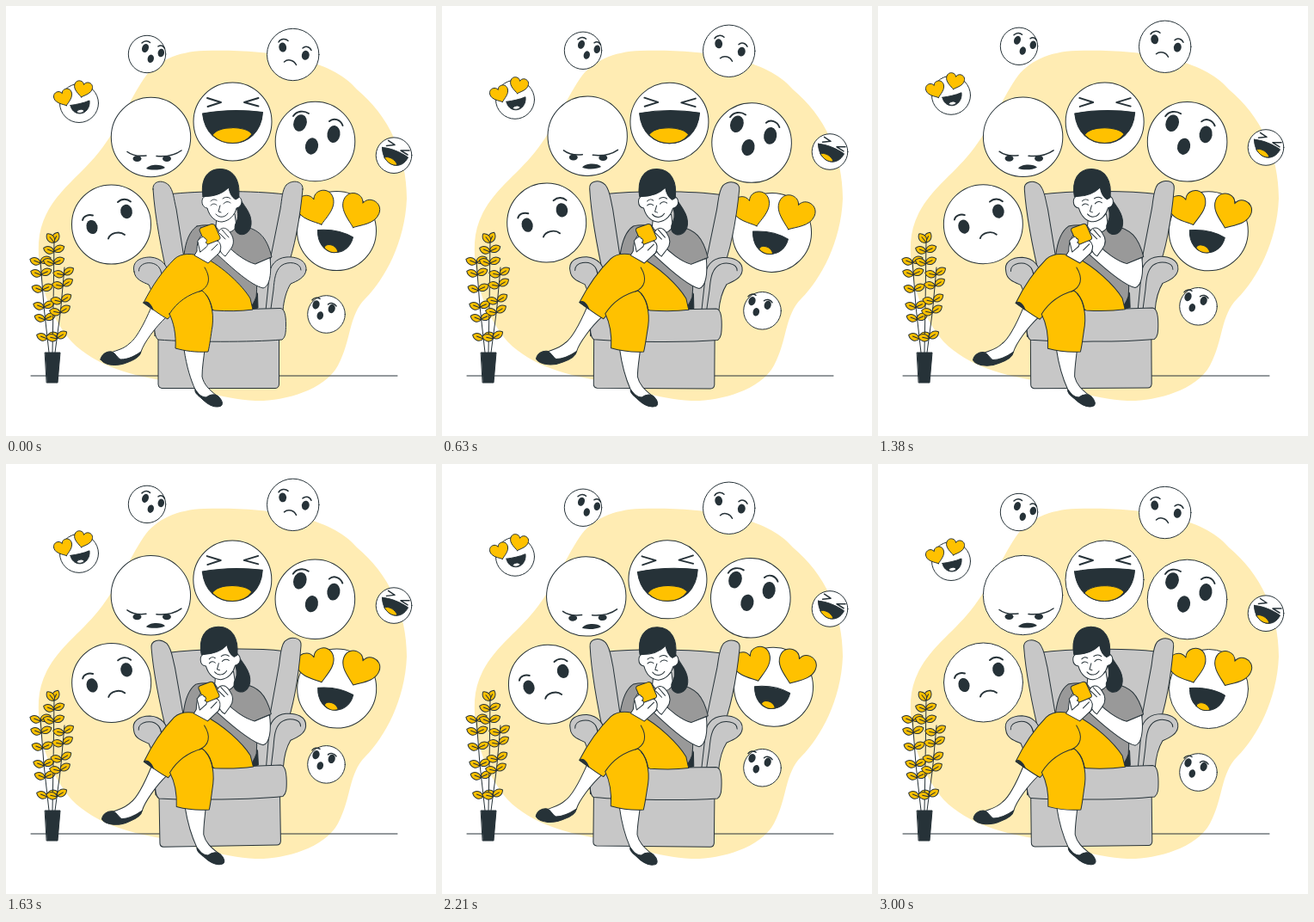
An HTML page for the animation above (3.04 s loop, 500 by 500 pixels).

```html
<!DOCTYPE html>
<html lang="en">
<head>
<meta charset="utf-8">
<title>Reactions</title>
<style>
  html, body { margin: 0; width: 100%; height: 100%; overflow: hidden; background: #fff; }
  svg { display: block; width: 100%; height: 100%; }
  .ink { fill: none; stroke: #263238; stroke-width: 1; stroke-linecap: round; stroke-linejoin: round; }
  .bold { stroke-width: 1.9; }
  .mid { stroke-width: 1.5; }
  .white { fill: #fff; }
  .gold { fill: #ffc100; }
  .dark { fill: #263238; }
  .chair { fill: #c7c7c7; }
  .shirt { fill: #999; }
  .none { fill: none; }
</style>
</head>
<body>
<svg viewBox="0 0 500 500" class="ink">
  <defs>
    <path id="heart" d="M0 20C-7 14-22 7-22-6C-22-14-16-18-10.500-18C-5-18-1.500-15 0-10.500C1.500-15 5-18 10.500-18C16-18 22-14 22-6C22 7 7 14 0 20Z" vector-effect="non-scaling-stroke"/>
  </defs>

  <path fill="#ffecb3" stroke="none" d="M230 52C290 50 375 57 408 97C445 128 466 172 466 224C464 275 440 318 418 340C398 360 402 388 386 418C370 448 320 460 290 459C250 457 215 443 185 436C150 430 105 420 76 390C50 360 36 318 38 275C42 225 80 205 108 170C132 140 142 112 160 85C174 64 200 53 230 52Z"/>
  <path d="M29 430H455"/>
  <g id="plant"></g>
  <path class="dark" d="M45.500 403H63L60 438H47.500Z"/>

  <g id="ring">
    <!-- angry -->
    <circle class="white" cx="168.500" cy="152.500" r="46.200"/>
    <path class="mid" d="M141 169.500C147 174 155 175 163 174M175 174.500C186 175.500 197 173 204 168"/>
    <g class="dark" stroke="none">
      <ellipse cx="152.500" cy="177.500" rx="5" ry="3.500"/>
      <ellipse cx="187" cy="177.500" rx="5" ry="3.500"/>
      <path d="M163 189C167 183.500 181 183.500 185 188C180 191 168 191.500 163 189Z"/>
    </g>
    <!-- laughing -->
    <circle class="white" cx="263.500" cy="134.500" r="45.500"/>
    <path class="bold" d="M234 107L250 112L234.500 117M293.500 107L277 112L293.500 116.500"/>
    <path class="dark" d="M228.500 125C250 121 276 120.500 298.500 123.500C297 147 281 159.500 263.500 159.500C246 159.500 231 148 228.500 125Z"/>
    <path class="gold" d="M240 150C247 139 279 139 286 149C281 156 272 159.500 263.500 159.500C253 159.500 246 156 240 150Z"/>
    <!-- surprised -->
    <circle class="white" cx="359.500" cy="157.500" r="46.300"/>
    <g id="bigGasp"></g>
    <path class="bold" d="M334 128C338 122 346 121 352 125M376 134C381 129.500 389 132 391.500 139"/>
    <!-- sad -->
    <circle class="white" cx="122.500" cy="254" r="46"/>
    <g id="bigSad"></g>
    <path class="bold" d="M89 249C90 244 96 242 101 243.500M130 228C135 223.500 141 224 145 227.500M119 270.500C121 264 132 261 138 266"/>
    <!-- in love -->
    <circle class="white" cx="384.500" cy="261.500" r="46"/>
    <use href="#heart" class="gold" transform="translate(361 235) rotate(-17)"/>
    <use href="#heart" class="gold" transform="translate(411 239) rotate(22)"/>
    <path class="dark" d="M362.500 260.500C376 259.500 392 262 403.500 269C401 280 392 287 382 286.500C370 286 362 275 362.500 260.500Z"/>
    <path class="gold" d="M370 281C372 275 384 277 386 286C379 288 373 285 370 281Z"/>
  </g>

  <g id="person">
    <!-- armchair -->
    <g class="chair">
      <path d="M188 219C225 214.500 290 214.500 324 219L314 362H200Z"/>
      <path d="M171 213C170 204 181 201 189 208C195 215 195 224 198 236L211 318L189 320C181 285 173 245 171 213Z"/>
      <path d="M345 213C346 204 334 201 326 208C321 214 321 224 319 236L305 306L325 310C336 282 342 245 345 213Z"/>
      <path d="M177 380V440Q177 444 181 444.500H313Q317 444.500 317.500 440V384Z"/>
      <path d="M149 309C146 297 156 292 168 292C181 293 189 302 189 315V362L173 384C173 356 173 338 166 324C159 321 150 318 149 309Z"/>
      <path class="none" d="M154.500 308C154 298 171 295 178 304C183 311 182 325 183 338"/>
      <path d="M349 307C350 296 338 291 326 292C314 293 306 302 306 315L302 354H322C323 342 326 331 331 323C338 320 348 316 349 307Z"/>
      <path class="none" d="M343 307C343 298 328 296 320 302C313 308 312 318 311 330L308 352"/>
      <path d="M173 366C179 355 200 353 240 353.500L319 351.500C324 352 325.500 360 325.500 370C325.500 380 325 385 321 388C285 391 215 391 177 388C173 386 172 376 173 366Z"/>
    </g>

    <!-- torso -->
    <path class="dark" d="M282 338C286 332 292 331 292.500 335L293 351L284 353Z"/>
    <path class="shirt" d="M222 256C230 254 238 255 245 255L276 256C294 260 303 268 309 292L289.500 300C292 314 292 328 291 338C289 344 286 348 284 352L240 335L214 300L207 289C209 274 213 262 222 256Z"/>
    <path class="white" d="M245 246L244 256C249 267 263 266 268 256L266 242Z"/>
    <path class="dark" d="M270 218C271 228 284 236 285 250C286 261 279 267 272 265.500C265 263 265 256 268 251C272 243 268 234 266 226Z"/>

    <!-- legs -->
    <path class="white" d="M207 399C210 420 215 435 220 446L229 457C238 458 243 456 245 453C236 446 230 440 228 431C228 420 230 410 231 399Z"/>
    <path class="dark" d="M220 446C222 450 227 455 233 455C238 451 244 451 247 454C252 459 253 464 249 465.500C240 468 232 461 227 456C222 452 219 449 220 446Z"/>
    <path class="white" d="M169 350C160 371 151 387 144 392C137 399 129 400 122 403L128 413C140 412 151 408 157 402C160 392 174 373 186 362Z"/>
    <path class="dark" d="M110 411C111 405 117 401 123 402C128 404 129 409 133 411C143 411 151 406 157 402C156 408 148 412 141 414.500C131 419 115 419 110 411Z"/>
    <path class="gold" d="M160 345C170 325 182 308 196 294C204 287 216 287 230 292C252 303 275 325 284 340L287 353C272 355 258 355 242 354L225 345C212 342 200 350 188 364C180 360 170 352 160 345Z"/>
    <path class="dark" d="M160 345C163 342 168 345 171 353Z"/>
    <path class="gold" d="M190 358C199 344 212 335 228 331C238 338 242 356 240 372C238 384 237 394 235 402C220 403 208 401 197 398C198 382 195 368 190 358Z"/>
    <path d="M231 304C239 317 236 327 225 332M240 354C239 347 236 339 232 335"/>

    <!-- head -->
    <path class="white" d="M233 221C226 221 226 234 234 235C237 246 244 251 251 251C260 250 266 243 268 235C277 233 275 220 268 222L260 208Z"/>
    <path class="dark" d="M229 221.500C226 203 233 189.500 249 189.500C266 189.500 273 205 270.500 223L267 225C262 222 260 217 259 211C252 218 242 222 229 221.500Z"/>
    <path d="M238 232C240 229.500 243 229.500 245 231.500M253 230C255 227 259 227 261 229M238 227C240 224.500 243 224.500 245 226M252 224C255 221.500 259 222 261 224M249 232L247 239L250 240M244 242C248 247 255 246 258 241"/>

    <!-- arms and phone -->
    <path class="white" d="M307 293C309 310 307 326 299 328C285 325 262 304 246 289L257 278C264 286 278 297 289.500 300Z"/>
    <path class="white" d="M246 266C248 256 256 256 261 264C266 271 265 278 261 283L255 291C249 288 246 280 246 266Z"/>
    <path class="white" d="M228 266C223 271 222 277 222 285L219 290L235 299L248 287C251 281 250 276 246 273L236 272Z"/>
    <path class="gold" d="M226.500 258L239 253.500Q242 253 243 255.500L249 269Q249.500 271 247.500 272L235 277Q232.500 277.500 231.500 275.500L225 261Q224.500 259 226.500 258Z"/>
    <path class="white" d="M223 273C226 269 230 267 231 270C234 271 234 274 232 275C235 276 235 279 232 281L226 286Z"/>
    <path d="M248 264L255 271M251 260L259 269M239 284L246 277"/>
  </g>

  <g class="float">
    <circle class="white" cx="164" cy="56" r="21.700"/>
    <g id="topGasp"></g>
    <path class="mid" d="M158 43C161 40 165 40 167.500 42.500M177 47C180 45 183 46 184.500 49.500"/>
  </g>
  <g class="float">
    <circle class="white" cx="333.700" cy="56.500" r="30.200"/>
    <g id="smallSad"></g>
    <path class="mid" d="M317 42C319 38 325 37.500 328 40.500M345 49C348 46 353 47 355 51.500M323.500 65C328 61 335 63 337.500 68.500"/>
  </g>
  <g class="float">
    <circle class="white" cx="85" cy="113" r="22.500"/>
    <use href="#heart" class="gold" transform="translate(67 106.500) rotate(-20) scale(.49)"/>
    <use href="#heart" class="gold" transform="translate(89.500 96.500) rotate(12) scale(.48)"/>
    <path class="dark" d="M75 115.500C82 114.500 90 113 97 110C98 119 92 125 86 125C80 125 76 121 75 115.500Z"/>
    <path class="white" d="M82 123.500C83 120 89 119 91 122C88 125 85 125 82 123.500Z"/>
  </g>
  <g class="float">
    <circle class="white" cx="451" cy="173.700" r="20.800"/>
    <path class="mid" d="M444.500 156.500L452 161.500L442.500 162.500M469 168L459 168L467 173"/>
    <path class="dark" d="M437.500 164.500C447 165 459 170 467.500 176C464 183 458 186.500 451 185C443 183 437.500 175 437.500 164.500Z"/>
    <path class="gold" d="M440 176C444 174 453 178 455 185C449 186 443 182 440 176Z"/>
  </g>
  <g class="float">
    <circle class="white" cx="372.500" cy="358.500" r="21.800"/>
    <g id="lowGasp"></g>
    <path class="mid" d="M356 342C358 339 362 338.500 365 340.500M374.500 347C377 344.500 382 345.500 384 349"/>
  </g>
</svg>

<script>
const byId = id => document.getElementById(id);

// Dark tilted ovals for eyes and open mouths: [x, y, rx, ry, tilt]
function ovals(id, list) {
  byId(id).innerHTML = list.map(([x, y, rx, ry, tilt]) =>
    `<ellipse class="dark" stroke="none" rx="${rx}" ry="${ry}" transform="translate(${x} ${y}) rotate(${tilt})"/>`).join("");
}
ovals("bigGasp", [[342, 136, 7.6, 10, 18], [381, 149, 7.5, 10, 8], [355.5, 163, 7.5, 9.7, 12]]);
ovals("bigSad", [[100, 257, 6.5, 8.2, -15], [140, 239, 6.8, 8.2, -12]]);
ovals("topGasp", [[162, 49, 3.8, 5.2, 22], [180.3, 54.5, 3.7, 4.8, 10], [168.3, 61.3, 3.6, 4.8, 15]]);
ovals("smallSad", [[321.7, 48, 4.4, 5.5, -8], [348.3, 57.3, 4.4, 5.5, 12]]);
ovals("lowGasp", [[360.5, 347.3, 4, 5.2, 20], [378.7, 352, 4, 5.2, 15], [365.3, 360, 3.7, 4.8, 15]]);

// Each stem bows from the pot to a tip and carries leaf pairs at the given heights.
const stems = [
  { tip: [40, 296], foot: [50, 403], tilt: 0, leaves: [298, 312, 330, 350, 364, 386] },
  { tip: [56, 272], foot: [54, 403], tilt: 0, leaves: [285, 299] },
  { tip: [68, 304], foot: [57, 403], tilt: -8, leaves: [312, 325, 343, 356, 386] }
];
const leaf = (x, y, angle) =>
  `<path class="gold" transform="translate(${x} ${y}) rotate(${angle})" d="M0 0C2-6 9.500-6 13-1C10 4.500 3.500 5 0 0ZM0 0L8-.5"/>`;
byId("plant").innerHTML = stems.map(({ tip, foot, tilt, leaves }) => {
  const xAt = y => {
    const k = (foot[1] - y) / (foot[1] - tip[1]);
    return foot[0] + (tip[0] - foot[0]) * k * (1.4 - .4 * k);
  };
  const pairs = leaves.map(y => leaf(xAt(y), y, tilt - 20) + leaf(xAt(y), y + 1, tilt + 205));
  const bend = [foot[0] + (tip[0] - foot[0]) * .7, (foot[1] + tip[1]) / 2];
  return `<path d="M${foot}Q${bend} ${tip}"/>` + pairs.join("");
}).join("") + leaf(55, 275, -60) + leaf(56, 275, -125);

const LOOP = 3040, CYCLE = 3000;
const ring = byId("ring"), person = byId("person");
const floaters = document.querySelectorAll(".float");

// Linear sway: 0 -> 1 at a quarter, -1 at three quarters, back to 0
function sway(phase) {
  const p = phase % 1;
  return p < .25 ? p * 4 : p < .75 ? 2 - p * 4 : p * 4 - 4;
}

function draw(time) {
  const t = Math.min(time, CYCLE);
  const lift = 10 * (1 - Math.abs(1 - 2 * t / CYCLE));
  floaters.forEach(f => f.setAttribute("transform", `translate(0 ${-lift})`));
  ring.setAttribute("transform", `rotate(${sway(t / CYCLE)} 254 198)`);
  const lean = t < 500 ? 0 : sway((t - 500) / 1500);
  person.setAttribute("transform", `rotate(${lean} 229 327)`);
}

const start = performance.now();
function tick() {
  draw((performance.now() - start) % LOOP);
  requestAnimationFrame(tick);
}
tick();
</script>
</body>
</html>
```
